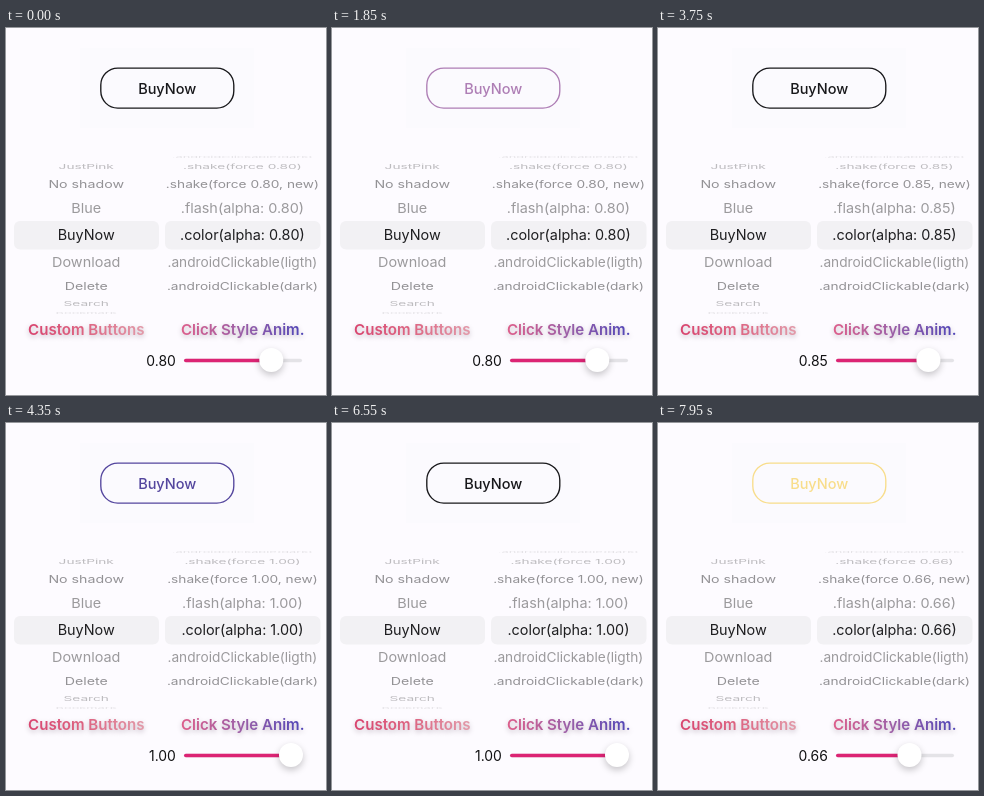
Animation of 320x367 px, one loop 8 s. Source, as an HTML page with a canvas:

```html
<!DOCTYPE html>
<html lang="en">
<head>
<meta charset="utf-8">
<title>Button styles</title>
<style>
html, body { margin: 0; width: 100%; height: 100%; overflow: hidden; background: #fdfbff; }
canvas { display: block; width: 100vw; height: 100vh; }
</style>
</head>
<body>
<canvas id="stage"></canvas>
<script>
const W = 320, H = 367, LOOP = 8000;
const FONT = 'Inter, "Liberation Sans", sans-serif';
const canvas = document.getElementById('stage');
const ctx = canvas.getContext('2d');
const dpr = window.devicePixelRatio || 1;
canvas.width = W * dpr;
canvas.height = H * dpr;

const BLACK = [24, 24, 27];
const MAUVE = [174, 126, 181], PLUM = [155, 116, 169];
const INDIGO = [84, 70, 158], YELLOW = [248, 221, 139];
const FADE = 350;

// Each tap tints the button at once; letting go fades it back to black.
const taps = [
  { down: 1300, up: 2000, color: MAUVE },
  { down: 2750, up: 3050, color: PLUM },
  { down: 4250, up: 4650, color: INDIGO },
  { down: 5450, up: 5850, color: INDIGO },
  { down: 7150, up: 7350, color: YELLOW },
  { down: 7950, up: 8000, color: YELLOW }
];

const clamp = v => Math.min(1, Math.max(0, v));
const mix = (a, b, p) => a + (b - a) * p;
const ease = p => p * p * (3 - 2 * p);
const progress = (t, from, to) => ease(clamp((t - from) / (to - from)));

function buttonColor(t) {
  const tap = taps.filter(k => t >= k.down).pop();
  if (!tap) return BLACK;
  const p = progress(t, tap.up, tap.up + FADE);
  return tap.color.map((c, i) => Math.round(mix(c, BLACK[i], p)));
}

function sliderValue(t) {
  return 0.8 + 0.2 * progress(t, 3550, 4150) - 0.34 * progress(t, 6580, 6950);
}

function text(str, x, y, size, fill, weight = 400, align = 'center') {
  ctx.font = `${weight} ${size}px ${FONT}`;
  ctx.textAlign = align;
  ctx.fillStyle = fill;
  ctx.fillText(str, x, y + size * 0.36);
}

function box(x, y, w, h, r) {
  ctx.beginPath();
  ctx.roundRect(x, y, w, h, r);
}

function shadow(color, blur, dy) {
  ctx.shadowColor = color;
  ctx.shadowBlur = blur * dpr;
  ctx.shadowOffsetY = dy * dpr;
}

function drawButton(t) {
  const color = `rgb(${buttonColor(t)})`;
  ctx.fillStyle = '#fbfafe';
  ctx.fillRect(74, 20, 174, 80);
  box(94.8, 40.1, 133, 40, 17);
  ctx.strokeStyle = color;
  ctx.lineWidth = 1.35;
  ctx.stroke();
  text('BuyNow', 161.2, 60.3, 14.5, color, 500);
}

// Rows sit on a cylinder: they sink and flatten away from the middle.
function drawWheel(x, rows) {
  const alphas = [0.95, 0.42, 0.45, 0.27, 0.1];
  const sizes = [14.4, 14.4, 14.2, 13.7, 12.8];
  rows.forEach((label, i) => {
    const angle = (i - 4) * 0.35, d = Math.abs(i - 4);
    const size = label.length > 20 ? Math.min(13.7, sizes[d]) : sizes[d];
    ctx.save();
    ctx.translate(x, 207.2 + 79 * Math.sin(angle));
    ctx.scale(1, Math.cos(angle));
    text(label, 0, 0, size, `rgba(18,18,20,${alphas[d]})`);
    ctx.restore();
  });
}

function drawWheels(value) {
  ctx.fillStyle = '#f2f1f4';
  for (const x of [8, 159]) {
    box(x, 193, x === 8 ? 145 : 155.5, 28.5, 6);
    ctx.fill();
  }
  drawWheel(80.2, ['', 'JustPink', 'No shadow', 'Blue', 'BuyNow',
    'Download', 'Delete', 'Search', 'Bookmark']);
  drawWheel(236.4, [
    '.androidClickable(dark)', `.shake(force ${value})`, `.shake(force ${value}, new)`,
    `.flash(alpha: ${value})`, `.color(alpha: ${value})`,
    '.androidClickable(ligth)', '.androidClickable(dark)', '', ''
  ]);
}

function drawTitle(label, x, left, right, colors) {
  const fill = ctx.createLinearGradient(left, 0, right, 0);
  colors.forEach((c, i) => fill.addColorStop(i / (colors.length - 1), c));
  ctx.save();
  shadow('rgba(70,40,70,0.3)', 5, 2.5);
  text(label, x, 301.4, 15.05, fill, 600);
  ctx.restore();
}

function drawSlider(value) {
  const x = 186.5 + 98.5 * value, y = 332.6;
  text(value.toFixed(2), 169.8, y, 13.9, '#111113', 400, 'right');
  ctx.fillStyle = '#e4e3e7';
  box(178, y - 1.75, 118, 3.5, 1.75);
  ctx.fill();
  ctx.fillStyle = '#dc2474';
  box(178, y - 1.75, x - 178, 3.5, 1.75);
  ctx.fill();
  ctx.save();
  shadow('rgba(0,0,0,0.22)', 7, 3);
  ctx.fillStyle = '#fff';
  ctx.beginPath();
  ctx.arc(x, 332, 12, 0, Math.PI * 2);
  ctx.fill();
  ctx.restore();
}

function draw(t) {
  const value = sliderValue(t);
  ctx.setTransform(dpr, 0, 0, dpr, 0, 0);
  ctx.fillStyle = '#fdfbff';
  ctx.fillRect(0, 0, W, H);
  drawButton(t);
  drawWheels(value.toFixed(2));
  drawTitle('Custom Buttons', 80.3, 22, 138, ['#d9456f', '#dd6683', '#e29aa9']);
  drawTitle('Click Style Anim.', 236.7, 176, 298, ['#dc5f8c', '#9a5fa8', '#5046b8']);
  drawSlider(value);
}

const start = performance.now();
function tick() {
  draw((performance.now() - start) % LOOP);
  requestAnimationFrame(tick);
}
tick();
</script>
</body>
</html>
```
